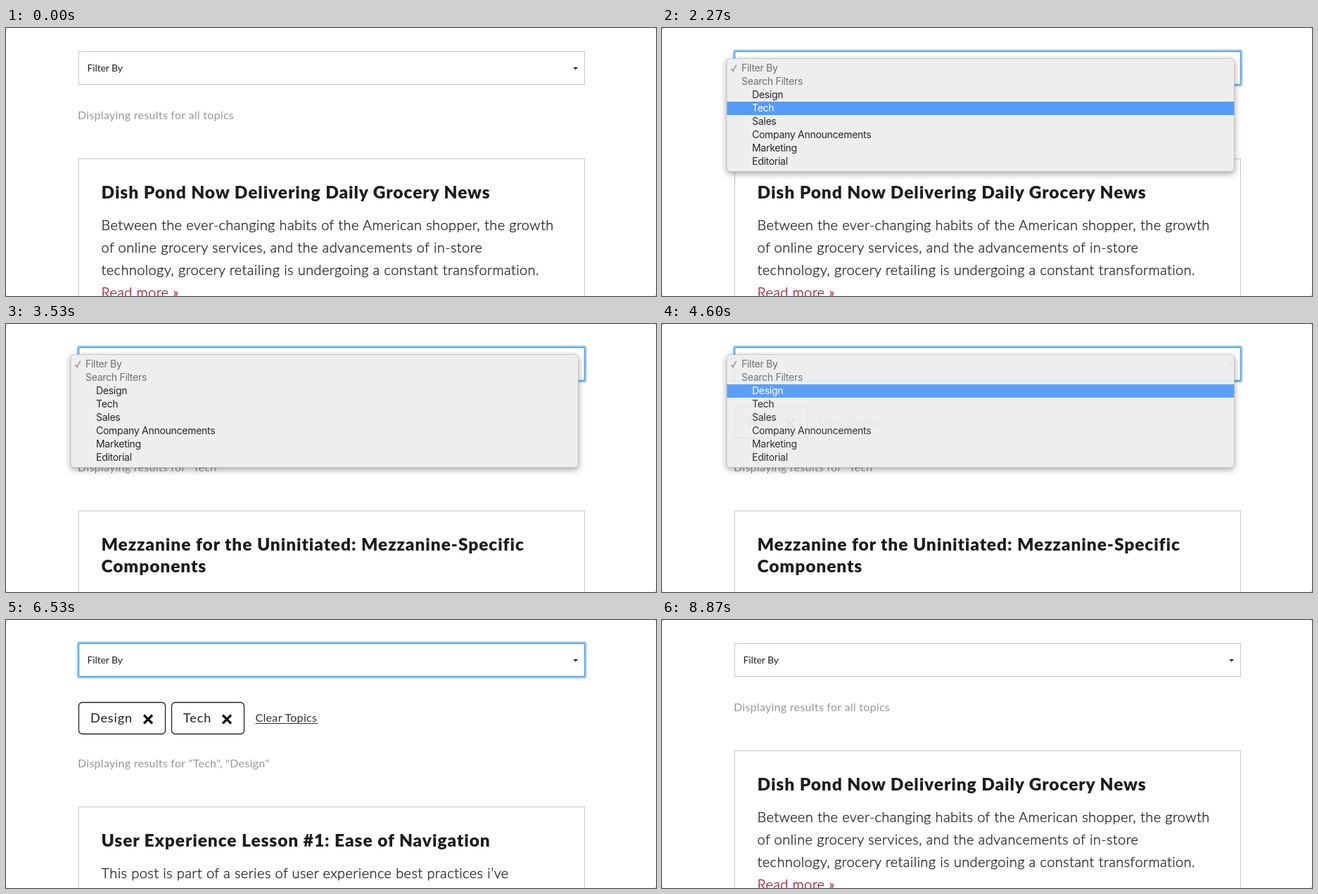
An HTML page for the animation above (8990 ms loop, 924 px wide and 382 px high).

```html
<!DOCTYPE html>
<html lang="en">
<head>
<meta charset="utf-8">
<title>Topic filter</title>
<style>
  html, body { margin: 0; width: 100%; height: 100%; overflow: hidden; background: #c4c4c4; }
  svg { display: block; width: 924px; height: 382px; }
  text { font-family: Lato, sans-serif; white-space: pre; }
  .select { font-size: 14px; letter-spacing: -.12px; fill: #222; }
  .status { font-size: 16px; letter-spacing: .28px; fill: #999; }
  .clear { font-size: 16px; letter-spacing: .32px; fill: #333; }
  .chip { font-size: 18px; letter-spacing: .9px; fill: #1c1c1c; }
  .title { font-size: 24.5px; font-weight: 900; letter-spacing: .92px; fill: #1c1c1c; }
  .body { font-size: 20px; font-weight: 300; letter-spacing: .4px; color: #222; fill: currentColor; stroke: currentColor; stroke-width: .35; }
  .link { color: #a3142f; }
  .item { font: 14px Inter, sans-serif; letter-spacing: -.28px; fill: #262626; }
  .item.off { fill: #6f6f6f; }
  .item.on { fill: #fff; }
  .box { fill: none; stroke: #c8c8c8; }
  .outline { fill: none; stroke: #222; stroke-width: 1.3; }
  .cross { stroke: #111; stroke-width: 3.2; }
  #panel { fill: #eee; stroke: #b4b4b4; stroke-width: .6; filter: drop-shadow(0 3px 5px rgba(0, 0, 0, .36)); }
</style>
</head>
<body>
<svg id="stage" viewBox="0 0 924 382"></svg>
<script>
const LOOP = 8990;
const MENU_ITEMS = ['Filter By', 'Search Filters', 'Design', 'Tech', 'Sales',
  'Company Announcements', 'Marketing', 'Editorial'];
const FADE_DELAY = 135, FADE_TIME = 300, BLINK = 67;

// Each visit to the menu: when it opens, the hovered rows, and the click
const VISITS = [
  { open: 1600, hovers: [[1870, 2], [2070, 3]], click: 2530 },
  { open: 3470, hovers: [[3870, 2]], click: 4400 },
];
// Page shown from each time on
const PAGES = [[0, 0], [3070, 1], [4930, 2], [7270, 0]];
const FOCUS_END = 6870;

const text = (cls, x, y, str) => `<text class="${cls}" x="${x}" y="${y}">${str}</text>`;

const chip = (x, width, label) => {
  const cx = x + width - 24.5;
  return `<rect class="outline" x="${x}" y="117.5" width="${width}" height="45" rx="5"/>`
    + text('chip', x + 16.5, 146, label)
    + `<path class="cross" d="M${cx - 6} 135.5l12 12m0-12l-12 12"/>`;
};

const clearLink = x => text('clear', x, 145, 'Clear Topics')
  + `<path d="M${x} 147.5h89" stroke="#333"/>`;

// A results page: status line and card, moved down when chips are present
const page = (shift, chips, status, content) => `<g class="page">${chips}
  ${text('status', 102, 130 + shift, status)}
  <rect class="box" x="103.5" y="${186.5 + shift}" width="719" height="300"/>
  ${content.map(([cls, y, str]) => text(cls, 135.5, y, str)).join('')}</g>`;

const stage = document.getElementById('stage');
stage.innerHTML = `
  <rect width="924" height="382" rx="3.5" fill="#fff"/>
  <rect class="box" x="103.5" y="33.5" width="719" height="47"/>
  ${text('select', 115.5, 62, 'Filter By')}
  <path d="M806.5 56h6.4l-3.2 3.4z" fill="#111"/>
  ${page(0, '', 'Displaying results for all topics', [
    ['title', 242.7, 'Dish Pond Now Delivering Daily Grocery News'],
    ['body', 288, 'Between the ever-changing habits of the American shopper, the growth'],
    ['body', 320, 'of online grocery services, and the advancements of in-store'],
    ['body', 352, 'technology, grocery retailing is undergoing a constant transformation.'],
    ['body link', 384, 'Read more »'],
  ])}
  ${page(80, chip(103.5, 103, 'Tech') + clearLink(222.5), 'Displaying results for "Tech"', [
    ['title', 322.7, 'Mezzanine for the Uninitiated: Mezzanine-Specific'],
    ['title', 353.7, 'Components'],
  ])}
  ${page(80, chip(103.5, 123, 'Design') + chip(235.5, 103, 'Tech') + clearLink(354.5),
    'Displaying results for "Tech", "Design"', [
    ['title', 322.7, 'User Experience Lesson #1: Ease of Navigation'],
    ['body', 368, 'This post is part of a series of user experience best practices i’ve'],
  ])}
  <g id="ring" fill="none" stroke="#5fa5ea">
    <rect x="102.5" y="32.5" width="721" height="49" rx="2" stroke-width="4.5" opacity=".4"/>
    <rect x="103" y="33" width="720" height="48" rx="1" stroke-width="2" opacity=".85"/>
  </g>
  <g id="menu">
    <rect id="panel" x="92" y="43.5" width="721.5" height="161" rx="5"/>
    <rect id="bar" x="92.3" width="721" height="19" fill="#569bf6"/>
    <path d="M98.5 58l2.5 3.5 4.5-8.5" fill="none" stroke="#8a8a8a" stroke-width="1.4"/>
    ${MENU_ITEMS.map((label, i) =>
      text(i < 2 ? 'item off' : 'item', i < 2 ? 113 : 128, 62 + 19 * i, label)).join('')}
  </g>`;

const [ring, menu, bar] = ['ring', 'menu', 'bar'].map(id => document.getElementById(id));
const pages = [...stage.querySelectorAll('.page')];
const items = [...stage.querySelectorAll('.item')];
const show = (el, visible) => el.setAttribute('display', visible ? 'inline' : 'none');
const latest = (steps, t) => steps.filter(([start]) => start <= t).pop();

function draw(t) {
  const current = latest(PAGES, t)[1];
  pages.forEach((el, i) => show(el, i === current));
  show(ring, t >= VISITS[0].open && t < FOCUS_END);

  const visit = VISITS.find(v => t >= v.open && t < v.click + FADE_DELAY + FADE_TIME);
  show(menu, visit);
  if (!visit) return;

  const fade = Math.max(0, (t - visit.click - FADE_DELAY) / FADE_TIME);
  menu.setAttribute('opacity', 1 - fade * fade);
  const blinking = t >= visit.click && t < visit.click + BLINK;
  const hover = latest(visit.hovers, t);
  const row = hover && !blinking ? hover[1] : -1;
  show(bar, row >= 0);
  bar.setAttribute('y', 48 + 19 * row);
  items.forEach((el, i) => el.classList.toggle('on', i === row));
}

function tick() {
  draw(performance.now() % LOOP);
  requestAnimationFrame(tick);
}
tick();
</script>
</body>
</html>
```
